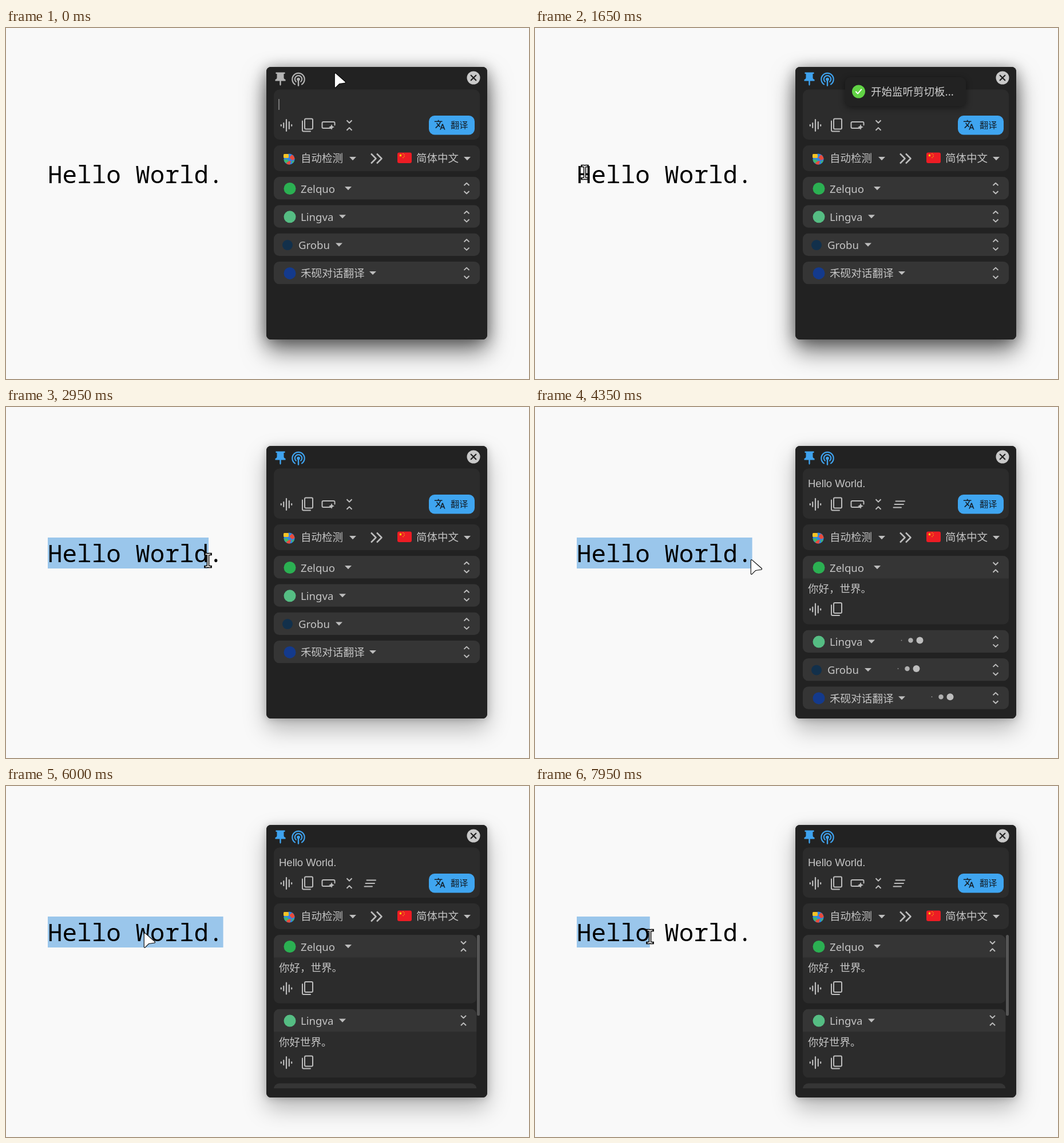
An HTML page with a canvas that plays this animation: 914x613 px, repeating every 8 s.

```html
<!DOCTYPE html>
<html lang="zh-CN">
<head>
<meta charset="utf-8">
<title>Clipboard translator</title>
<style>
html, body { margin: 0; width: 100%; height: 100%; overflow: hidden; background: #f9f9f9; }
canvas { display: block; width: 914px; height: 613px; }
</style>
</head>
<body>
<canvas id="stage"></canvas>
<script>
const W = 914, H = 613, LOOP = 8000, STEP = 50;
const canvas = document.getElementById('stage');
const ctx = canvas.getContext('2d');
const dpr = window.devicePixelRatio || 1;
canvas.width = W * dpr;
canvas.height = H * dpr;

const UI = '"Noto Sans", "Noto Sans CJK SC", "Noto Sans CJK", sans-serif';
const CJK = '"Noto Sans CJK SC", "Noto Sans CJK", sans-serif';
const MONO = '"Noto Sans Mono", monospace';
const ARIAL = '"Liberation Sans", sans-serif';
const GRAY = '#bdbdbd', BLUE = '#3fa3ef';
const CHAR_W = 25.55, TEXT_X = 73;

// Moments of the story, in ms
const PIN_ON = 400, LISTEN_ON = 650, BLUR = 2500, COPIED = 3450;
const DRAG_1 = 2550, DESELECT = 6200, DRAG_2 = 7450;

const services = [
  { name: 'Zelquo', color: '#2bb052', x: 515, arrow: 598, open: 3950, result: '你好，世界。' },
  { name: 'Lingva', color: '#55bd83', x: 515, arrow: 588, open: 4750, result: '你好世界。' },
  { name: 'Grobu', color: '#12304b', x: 511, arrow: 582, open: 5080, result: '你好，世界。' },
  { name: '禾砚对话翻译', color: '#143a8c', x: 515, arrow: 641, open: 5550, result: '你好世界。' }
];

// Pointer path: time, x, y
const path = [
  [0, 574, 79], [50, 574, 79], [350, 480, 90], [450, 480, 90], [600, 511, 97],
  [900, 511, 97], [1650, 87, 252], [1900, 75, 258], [2550, 75, 258],
  [2950, 353, 268], [3100, 377, 267], [5250, 377, 267], [5900, 241, 257],
  [6150, 241, 257], [6650, 75, 262], [7450, 75, 262], [7950, 201, 263], [8000, 201, 263]
];

const clamp = v => Math.max(0, Math.min(1, v));
const mix = (a, b, k) => a + (b - a) * k;
const smooth = k => k * k * (3 - 2 * k);

function bezier(x1, y1, x2, y2) {
  const at = (a, b, s) => 3 * a * s * (1 - s) ** 2 + 3 * b * s * s * (1 - s) + s ** 3;
  return x => {
    if (x <= 0 || x >= 1) return clamp(x);
    let lo = 0, hi = 1;
    for (let i = 0; i < 20; i++) {
      const mid = (lo + hi) / 2;
      if (at(x1, x2, mid) < x) lo = mid; else hi = mid;
    }
    return at(y1, y2, lo);
  };
}
const toastIn = bezier(.21, 1.02, .73, 1);
const toastOut = bezier(.06, .71, .55, 1);
const popIn = bezier(.175, .885, .32, 1.275);
const pulse = bezier(.2, .68, .18, 1.08);
const standard = bezier(.4, 0, .2, 1);

function pointer(t) {
  const i = Math.max(1, path.findIndex(p => p[0] > t));
  const a = path[i - 1], b = path[i];
  const k = smooth((t - a[0]) / (b[0] - a[0]));
  return [mix(a[1], b[1], k), mix(a[2], b[2], k)];
}

function box(x, y, w, h, r, fill) {
  ctx.beginPath();
  ctx.roundRect(x, y, w, h, r);
  ctx.fillStyle = fill;
  ctx.fill();
}
function disc(x, y, r, fill) {
  ctx.beginPath();
  ctx.arc(x, y, r, 0, 7);
  ctx.fillStyle = fill;
  ctx.fill();
}
function stroke(d, color, width, x = 0, y = 0, cap = 'round') {
  ctx.save();
  ctx.translate(x, y);
  ctx.strokeStyle = color;
  ctx.lineWidth = width;
  ctx.lineCap = cap;
  ctx.lineJoin = 'round';
  ctx.stroke(new Path2D(d));
  ctx.restore();
}
function shape(d, color, x = 0, y = 0, scale = 1) {
  ctx.save();
  ctx.translate(x, y);
  ctx.scale(scale, scale);
  ctx.fillStyle = color;
  ctx.fill(new Path2D(d));
  ctx.restore();
}
function text(s, x, y, size, color = '#c4c4c4', family = UI, weight = 400) {
  ctx.font = `${weight} ${size}px ${family}`;
  ctx.fillStyle = color;
  ctx.fillText(s, x, y);
}
function withShadow(oy, blur, color, draw) {
  ctx.save();
  ctx.shadowOffsetY = oy * dpr;
  ctx.shadowBlur = blur * dpr;
  ctx.shadowColor = color;
  draw();
  ctx.restore();
}

// Icons
const dropArrow = (x, y) => shape('M-6 -3H6L0 3.2Z', GRAY, x, y);
const unfoldMore = (x, y) => stroke('M-4.5 -5L0 -9.3L4.5 -5M-4.5 5L0 9.3L4.5 5', GRAY, 2, x, y, 'butt');
const unfoldLess = (x, y) => stroke('M-4.5 -8.7L0 -4.3L4.5 -8.7M-4.5 8.7L0 4.3L4.5 8.7', GRAY, 2, x, y, 'butt');
const wave = (x, y) => stroke('M-9.2 -1V1M-4.8 -4V4M0 -10V10M4.8 -6V6M9.2 -1V1', GRAY, 2.2, x, y);
const copyIcon = (x, y) => stroke(
  'M-3 -11H7Q9 -11 9 -9V5Q9 7 7 7H-3Q-5 7 -5 5V-9Q-5 -11 -3 -11ZM-9 -7V9Q-9 11 -7 11H5', GRAY, 2, x, y);

function pinIcon(color) {
  shape('M-8 -10.5H8V-8H6V-1.5Q6 1 9 2V4.5H1.2V11L0 13L-1.2 11V4.5H-9V2Q-6 1 -6 -1.5V-8H-8Z', color, 479.5, 88);
}
function listenIcon(color) {
  stroke('M-6 8.9A10.7 10.7 0 1 1 6 8.9M-4.2 4.3A6.2 6.2 0 1 1 4.2 4.3', color, 2.2, 511, 89.5);
  disc(511, 89.5, 2.8, color);
  stroke('M0 0V11', color, 2.4, 511, 89.5);
}
function globe() {
  disc(495, 229, 9.6, '#2f86e4');
  ctx.save();
  ctx.beginPath();
  ctx.arc(495, 229, 9.6, 0, 7);
  ctx.clip();
  shape('M0 -3L5 -8L11 -1L5 2ZM-6 4L3 3L1 11L-4 9Z', '#e84b3c', 495, 229);
  shape('M-10 1L-4 0L-1 4L-6 7ZM4 4L9 2L6 8Z', '#41b86a', 495, 229);
  ctx.restore();
  box(485, 220, 9, 7, 1.5, '#f7c325');
}
function star(x, y, r) {
  ctx.beginPath();
  for (let i = 0; i < 10; i++) {
    const a = -Math.PI / 2 + i * Math.PI / 5, d = i % 2 ? r * .4 : r;
    ctx.lineTo(x + d * Math.cos(a), y + d * Math.sin(a));
  }
  ctx.fillStyle = '#ffde00';
  ctx.fill();
}
function flag() {
  box(684, 217.5, 25, 18.5, 3, '#ed1c24');
  star(689.5, 222.5, 2.9);
  [[694, 219.6], [696, 221.6], [696, 224.3], [694, 226.3]].forEach(p => star(p[0], p[1], 1.1));
}

function page(t) {
  ctx.fillStyle = '#f9f9f9';
  ctx.fillRect(0, 0, W, H);
  const x = pointer(t)[0];
  const dragging = t >= DRAG_1 && t < DESELECT || t >= DRAG_2;
  let count = 0;
  if (dragging) count = t >= 3100 && t < DESELECT ? 12 : Math.round((x - TEXT_X) / CHAR_W);
  if (count > 0) {
    ctx.fillStyle = '#9ac6eb';
    ctx.fillRect(TEXT_X, 228, count * CHAR_W, 54);
  }
  text('Hello World.', TEXT_X, 271, CHAR_W / .6, '#000', MONO);
}

function panel(t) {
  const body = () => box(455, 68, 386, 476, 8, '#222');
  if (t < BLUR) {
    withShadow(20, 42, 'rgba(0,0,0,.55)', body);
    withShadow(2, 24, 'rgba(0,0,0,.36)', body);
  } else {
    withShadow(18, 40, 'rgba(0,0,0,.28)', body);
    withShadow(1, 14, 'rgba(0,0,0,.22)', body);
  }
  pinIcon(t >= PIN_ON ? BLUE : '#b4b4b4');
  listenIcon(t >= LISTEN_ON ? BLUE : '#b4b4b4');
  disc(817, 87, 11.5, '#c9c9c9');
  stroke('M-4.3 -4.3L4.3 4.3M4.3 -4.3L-4.3 4.3', '#222', 2.2, 817, 87);

  box(468, 107.5, 360, 87.5, 10, '#2c2c2c');
  if (t < PIN_ON) {
    ctx.fillStyle = '#c4c4c4';
    ctx.fillRect(476.5, 124, 1, 19);
  }
  wave(490, 170);
  copyIcon(527, 169.5);
  stroke('M5 5.5H-9Q-11 5.5 -11 3.5V-3.5Q-11 -5.5 -9 -5.5H9Q11 -5.5 11 -3.5V0', GRAY, 2, 563.5, 169.5);
  shape('M0 -5L1.5 -1.5L5 0L1.5 1.5L0 5L-1.5 1.5L-5 0L-1.5 -1.5Z', GRAY, 569, 173);
  unfoldLess(600, 170);
  if (t >= COPIED) {
    text('Hello World.', 477, 139.5, 18.5, '#c4c4c4', ARIAL);
    stroke('M-5.5 -5.5H10M-7.5 0H8M-9.5 5.5H4', GRAY, 2, 636, 170);
  }

  box(739, 153, 80, 33.5, 10, '#3fa5f0');
  shape('M12.87 15.07l-2.54-2.51.03-.03c1.74-1.94 2.98-4.17 3.71-6.53H17V4h-7V2H8v2H1v1.99h11.17C11.5 7.92 10.44 9.75 9 11.35 8.07 10.32 7.3 9.19 6.69 8h-2c.73 1.63 1.73 3.17 2.98 4.56l-5.09 5.02L4 19l5-5 3.11 3.11.76-2.04zM18.5 10h-2L12 22h2l1.12-3h4.75L21 22h2l-4.5-12zm-2.62 7l1.62-4.33L19.12 17h-3.24z',
    '#14202b', 748, 159, .85);
  text('翻译', 777, 175, 15.2, '#14202b', CJK);

  box(468, 205, 360, 45, 10, '#2d2d2d');
  globe();
  text('自动检测', 515, 234, 18.5, '#c4c4c4', CJK);
  dropArrow(606, 228);
  stroke('M-9 -8.5L-.5 0L-9 8.5M1 -8.5L9.5 0L1 8.5', GRAY, 2.5, 647, 228, 'butt');
  flag();
  text('简体中文', 717, 234, 18.5, '#c4c4c4', CJK);
  dropArrow(806, 228);
}

function loader(t, x, y) {
  for (let i = 0; i < 3; i++) {
    const local = t - COPIED - i * 120;
    const p = local < 0 ? 0 : (local % 750) / 750;
    const k = p < .45 ? pulse(p / .45) : p < .8 ? 1 - pulse((p - .45) / .35) : 0;
    ctx.globalAlpha = clamp(1 - .3 * k);
    disc(x + i * 16, y, 6 * Math.max(.05, 1 - .9 * k), GRAY);
  }
  ctx.globalAlpha = 1;
}

function results(t) {
  const top = 260, view = 268, head = 39.5, gap = 9.8, extra = 80.3;
  const grown = services.map(s => extra * standard((t - s.open) / 220));
  const total = grown.reduce((a, b) => a + b, 4 * head + 3 * gap);
  const scroll = total > view + 1;
  const w = scroll ? 354.5 : 360;
  ctx.save();
  ctx.beginPath();
  ctx.rect(460, top - .5, 375, view + .5);
  ctx.clip();
  let y = top;
  services.forEach((s, i) => {
    const h = head + grown[i];
    ctx.save();
    ctx.beginPath();
    ctx.roundRect(468, y, w, h, 10);
    ctx.clip();
    ctx.fillStyle = '#2c2c2c';
    ctx.fillRect(468, y, w, h);
    ctx.fillStyle = '#353535';
    ctx.fillRect(468, y, w, head);
    disc(s.x - 19, y + 20.5, s.x < 515 ? 9 : 10.5, s.color);
    text(s.name, s.x, y + 27.5, 18.6);
    dropArrow(s.arrow, y + 20);
    const side = scroll ? 799.5 : 805;
    if (t >= s.open) unfoldLess(side, y + 20); else unfoldMore(side, y + 20);
    if (t >= COPIED && t < s.open) loader(t, s.arrow + 52.5, y + 18);
    if (grown[i] > 0) {
      text(s.result, 477, y + 64, 18.5, '#c4c4c4', CJK);
      wave(490, y + 93.5);
      copyIcon(527, y + 93);
    }
    ctx.restore();
    y += h + gap;
  });
  ctx.restore();
  if (scroll) box(823, top, 5, view * view / total, 2.5, '#565656');
}

function tooltip(t) {
  const a = t < 1000 ? clamp((t - 700) / 150) : 1 - clamp((t - 1000) / 150);
  if (a <= 0) return;
  ctx.globalAlpha = a;
  box(457, 120, 114.5, 29, 8, 'rgba(97,97,97,.93)');
  text('剪切板监听模式', 465, 139, 14, '#fff', CJK, 500);
  ctx.globalAlpha = 1;
}

function toast(t) {
  const age = t - LISTEN_ON;
  if (age < 0 || age >= 2400) return;
  const leaving = age >= 2000;
  const k = leaving ? 1 - toastOut((age - 2000) / 400) : toastIn(age / 350);
  const scale = mix(.6, 1, k);
  ctx.save();
  ctx.beginPath();
  ctx.roundRect(455, 68, 386, 476, 8);
  ctx.clip();
  ctx.globalAlpha = leaving ? k : mix(.5, 1, k);
  ctx.translate(647.5, 111 - (leaving ? 75 : 101) * (1 - k));
  ctx.scale(scale, scale);
  withShadow(3, 12, 'rgba(0,0,0,.45)', () => box(-105.5, -25, 211, 50.5, 9, '#222'));
  const r = 11.5 * popIn((age - 40) / 300);
  if (r > 0) disc(-82, 0, r, '#61d345');
  const tick = clamp((age - 200) / 200);
  if (tick > 0) {
    ctx.setLineDash([15 * tick, 30]);
    stroke('M-4.6 .2L-1.4 3.6L4.8 -3.6', '#fff', 2, -82, 0);
    ctx.setLineDash([]);
  }
  text('开始监听剪切板...', -60.5, 7, 18.5, '#cfcfcf', CJK);
  ctx.restore();
}

function cursor(t) {
  const [x, y] = pointer(t);
  const outlined = (d, width) => {
    stroke(d, '#000', width, x, y);
    shape(d, '#fff', x, y);
  };
  if (t >= 300 && t < 1000) {
    outlined('M-4 1Q-4 -2 -1.7 -2Q.5 -2 .5 1V7Q3 5.5 4.5 8Q7 7 8 9.3Q10.5 9 10.5 12V16Q10.5 19 8 23H-3Q-4 19 -9 14Q-10.5 11.5 -8.5 11Q-7 10.5 -4 13.5Z', 2.4);
  } else if (t < 300 || t >= 3150 && t < DESELECT || x > 455) {
    outlined('M.8 1V24.2Q1.2 25 2 24.3L8.3 18L18.5 16.5Q19.3 16 18.7 15.2L2 .6Q1 0 .8 1Z', 2.2);
  } else {
    const beam = 'M-4.5 -11H-1.5L0 -10L1.5 -11H4.5M-4.5 11H-1.5L0 10L1.5 11H4.5M0 -10V10';
    stroke(beam, '#000', 4.6, x, y, 'square');
    stroke(beam, '#fff', 1.6, x, y, 'butt');
  }
}

function draw(t) {
  ctx.setTransform(dpr, 0, 0, dpr, 0, 0);
  page(t);
  panel(t);
  results(t);
  tooltip(t);
  toast(t);
  cursor(t);
}

const start = performance.now();
function tick() {
  const t = (performance.now() - start) % LOOP;
  draw(Math.floor(t / STEP) * STEP);
  requestAnimationFrame(tick);
}
tick();
</script>
</body>
</html>
```
